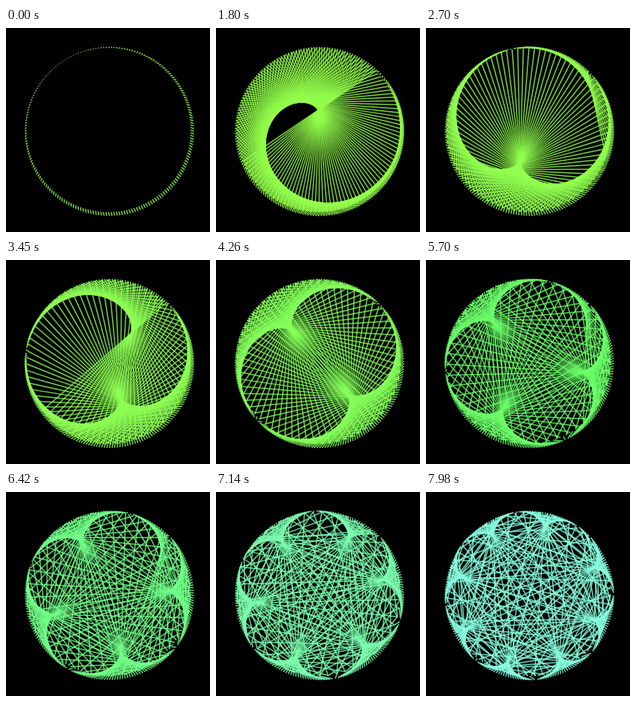
These frames come from a looping animation (256x256 px, 8 s). An HTML page with a canvas:

```html
<!DOCTYPE html>
<html lang="en">
<head>
<meta charset="utf-8">
<title>Times table circle</title>
<style>
  html, body { margin: 0; height: 100%; overflow: hidden; background: #000; }
  canvas { display: block; width: 256px; height: 256px; }
</style>
</head>
<body>
<canvas id="stage" width="256" height="256"></canvas>
<script>
const ctx = document.getElementById('stage').getContext('2d');
const LOOP = 8000;
const COUNT = 200;
const START = -Math.PI / 4;

// Chords run from the outer ring to a slightly smaller, shifted one.
const outer = { x: 129.8, y: 129.8, r: 106 };
const inner = { x: 128.6, y: 127.9, r: 103.1 };

// Multiplier over time: [seconds, value]
const keys = [[0, 1], [1.8, 1.57], [2.7, 2.19], [4.26, 2.96], [5.7, 4.28], [7.14, 6.78], [8, 9.3]];

function slope(i) {
  const a = keys[Math.max(i - 1, 0)];
  const b = keys[Math.min(i + 1, keys.length - 1)];
  return (b[1] - a[1]) / (b[0] - a[0]);
}

// Smooth cubic through the keys
function multiplier(t) {
  let i = 0;
  while (i < keys.length - 2 && t > keys[i + 1][0]) i++;
  const [t0, k0] = keys[i];
  const [t1, k1] = keys[i + 1];
  const d = t1 - t0;
  const u = (t - t0) / d;
  const v = 1 - u;
  return v * v * ((1 + 2 * u) * k0 + u * d * slope(i))
       + u * u * ((1 + 2 * v) * k1 - v * d * slope(i + 1));
}

function pointOn(ring, angle) {
  return [ring.x + ring.r * Math.cos(angle), ring.y + ring.r * Math.sin(angle)];
}

function draw(ms) {
  const progress = ms / LOOP;
  const k = multiplier(ms / 1000);
  const hue = 95 + 70 * progress ** 3.2;
  const light = 64 + 13 * progress ** 2;

  ctx.fillStyle = '#000';
  ctx.fillRect(0, 0, 256, 256);
  ctx.strokeStyle = `hsla(${hue}, 100%, ${light}%, 0.8)`;
  ctx.lineWidth = 1.5;

  for (let i = 0; i < COUNT; i++) {
    const angle = i / COUNT * 2 * Math.PI;
    ctx.beginPath();
    ctx.moveTo(...pointOn(outer, START + angle));
    ctx.lineTo(...pointOn(inner, START + angle * k));
    ctx.stroke();
  }
}

function frame() {
  const ms = performance.now() % LOOP;
  draw(Math.floor(ms / 30) * 30);
  requestAnimationFrame(frame);
}
frame();
</script>
</body>
</html>
```
